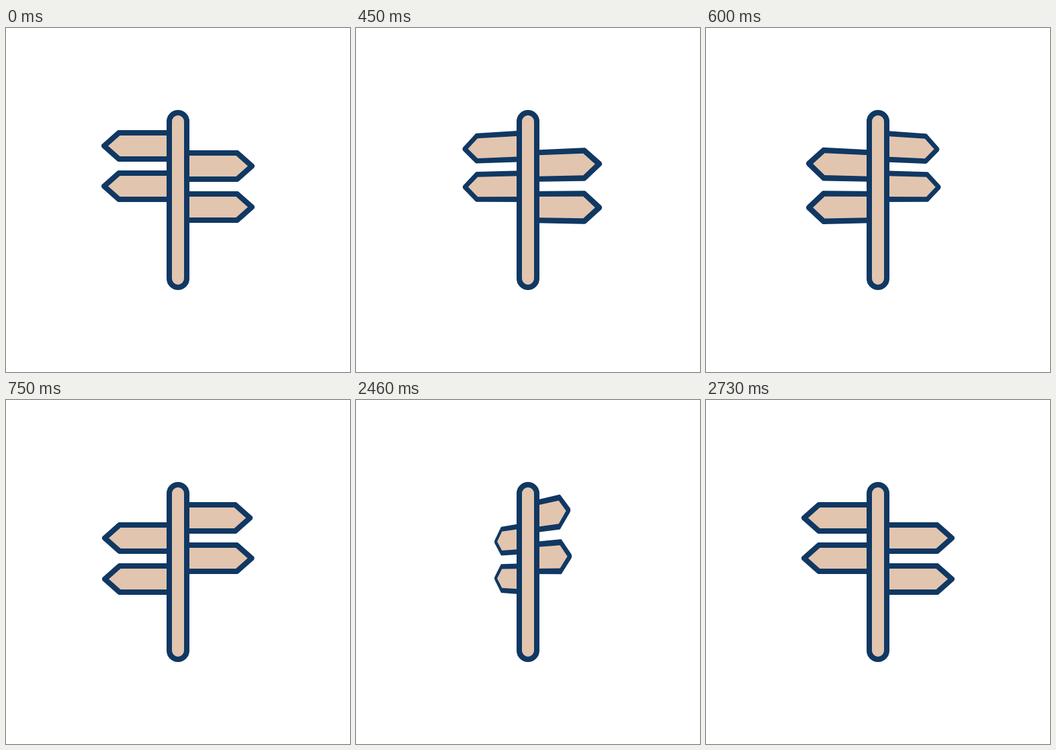
Recreate the animation shown at these times as an HTML page. Size 512x512 px, loop 3.6 s.

```html
<!DOCTYPE html>
<html lang="en">
<head>
<meta charset="utf-8">
<title>Turning signpost</title>
<style>
  html, body { margin: 0; width: 100%; height: 100%; overflow: hidden; background: #fff; }
  svg { display: block; width: 100%; height: 100%; }
</style>
</head>
<body>
<svg viewBox="0 0 512 512">
  <g id="signs"></g>
  <rect x="243" y="126" width="26" height="260" rx="13" fill="#e2c5af" stroke="#103863" stroke-width="8"/>
</svg>
<script>
const NAVY = '#103863', SAND = '#e2c5af';
const LOOP = 3600, STEP = 30, TURN = 450, STARTS = [303, 2263.5];
const DEPTH = 770, EYE = 256, HALF = 4;

// Centre height, direction and turning axis of each board
const boards = [
  { y: 175.5, dir: -1, axis: 254.6 },
  { y: 235.5, dir: -1, axis: 255.8 },
  { y: 205.5, dir: 1, axis: 256.5 },
  { y: 266.5, dir: 1, axis: 256.5 }
];

// Right-pointing board, measured from the middle of the post
const outline = [[0, -19.5], [88, -19.5], [110, 0], [88, 19.5], [0, 19.5]];

const normals = outline.map((p, i) => {
  const q = outline[(i + 1) % outline.length];
  return Math.atan2(p[0] - q[0], q[1] - p[1]);
});

function corner(i) {
  const n = outline.length, a = normals[(i + n - 1) % n];
  let turn = normals[i] - a;
  while (turn < 0) turn += 2 * Math.PI;
  return { a, turn };
}

// Rounded outer edge of the border
const outer = outline.flatMap(([x, y], i) => {
  const { a, turn } = corner(i);
  return Array.from({ length: 7 }, (_, k) => {
    const b = a + turn * k / 6;
    return [x + HALF * Math.cos(b), y + HALF * Math.sin(b)];
  });
});

// Sharp inner edge of the border
const inner = outline.map(([x, y], i) => {
  const { a, turn } = corner(i);
  const d = HALF / Math.cos(turn / 2), b = a + turn / 2;
  return [x - d * Math.cos(b), y - d * Math.sin(b)];
});

const group = document.getElementById('signs');

function addPolygon(fill) {
  const el = document.createElementNS('http://www.w3.org/2000/svg', 'polygon');
  el.setAttribute('fill', fill);
  group.appendChild(el);
  return el;
}

for (const b of boards) {
  b.edge = addPolygon(NAVY);
  b.face = addPolygon(SAND);
}

function project(points, board, angle) {
  return points.map(([px, py]) => {
    const r = 256 + board.dir * px - board.axis;
    const scale = DEPTH / (DEPTH - r * Math.sin(angle));
    const x = board.axis + r * Math.cos(angle) * scale;
    const y = EYE + (board.y + py - EYE) * scale;
    return x.toFixed(2) + ',' + y.toFixed(2);
  }).join(' ');
}

function ease(p) {
  p = Math.min(1, Math.max(0, p));
  return p < 0.5 ? 4 * p ** 3 : 1 - 4 * (1 - p) ** 3;
}

function draw(ms) {
  const t = Math.floor((ms % LOOP) / STEP) * STEP;
  const angle = Math.PI * STARTS.reduce((sum, s) => sum + ease((t - s) / TURN), 0);
  for (const b of boards) {
    b.edge.setAttribute('points', project(outer, b, angle));
    b.face.setAttribute('points', project(inner, b, angle));
  }
}

let begin;
function tick(now) {
  if (begin === undefined) begin = now;
  draw(now - begin);
  requestAnimationFrame(tick);
}
draw(0);
requestAnimationFrame(tick);
</script>
</body>
</html>
```
